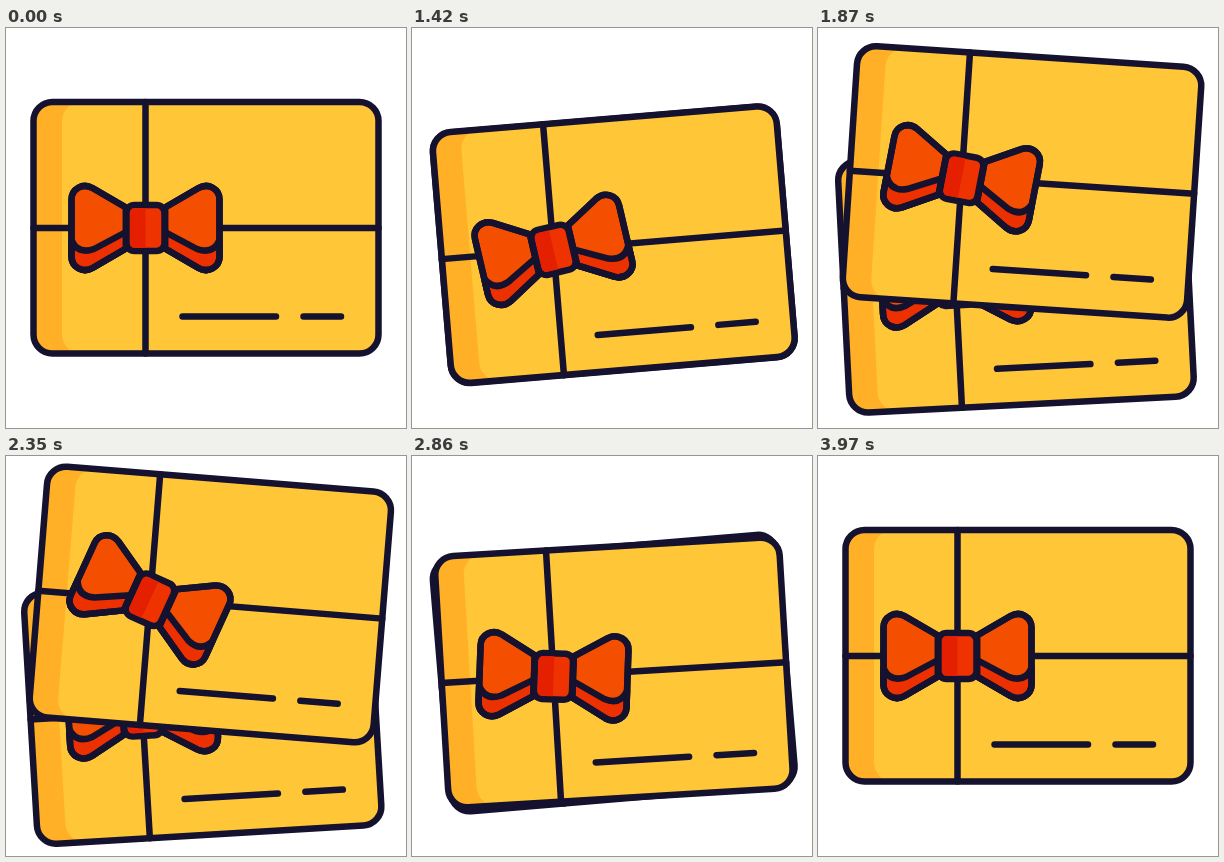
An HTML page that plays this animation: 400x400 px, repeating every 4 s.

```html
<!DOCTYPE html>
<html>
<head>
<meta charset="utf-8">
<style>
html, body { margin: 0; height: 100%; overflow: hidden; background: #fff; }
svg { display: block; width: 100vw; height: 100vh; }
</style>
</head>
<body>
<svg viewBox="0 0 400 400">
  <defs>
    <path id="shape" d="M120 179.5L86.5 160C76.5 154.5 65.5 161 65.5 171.5V228.5C65.5 239 76.5 245.5 86.5 240L120 220.5Z"/>
    <g id="wing">
      <use href="#shape" fill="#f44e00"/>
      <path fill="#ec3000" d="M65.5 212Q72 227 88 221L120 204V220.5L86.5 240C76.5 245.5 65.5 239 65.5 228.5Z"/>
      <use href="#shape" fill="none"/>
    </g>
    <g id="bow" stroke="#14122e" stroke-width="6.5" stroke-linejoin="round">
      <use href="#wing" stroke="inherit"/>
      <use href="#wing" transform="translate(279 0) scale(-1 1)"/>
      <rect x="120.5" y="177" width="38" height="46" rx="8" fill="#ee3200"/>
      <path d="M139.5 180V220H129Q124 220 124 215V185Q124 180 129 180Z" fill="#e52000" stroke="none"/>
    </g>
    <g id="card" stroke="#14122e" stroke-width="6.5" stroke-linecap="round">
      <rect x="27.5" y="74" width="345" height="251.5" rx="19" fill="#ffb027" stroke="none"/>
      <rect x="56" y="74" width="316.5" height="251.5" rx="19" fill="#ffc638" stroke="none"/>
      <path d="M139.5 74V325.5M27.5 200H372.5M176.5 288.5H270M297.5 288.5H335"/>
      <rect x="27.5" y="74" width="345" height="251.5" rx="19" fill="none"/>
    </g>
  </defs>
  <g id="back"><use href="#card"/><use href="#bow" stroke="none"/></g>
  <g id="front"><use href="#card"/><use href="#bow" id="frontBow"/></g>
</svg>
<script>
const LOOP = 4000;
const byId = id => document.getElementById(id);
const sine = u => (1 - Math.cos(Math.PI * u)) / 2;
const cubic = u => u < .5 ? 4 * u ** 3 : 1 - 4 * (1 - u) ** 3;

// Keys: [time, [values], easing towards this key]
const rest = [200, 200, 0], low = [201.8, 217, -4.8], high = [200, 192.6, 2.9];
const ending = [[3400, high], [3830, rest]];
const opening = [[1010, rest], [1400, low]];
const frontKeys = [...opening,
  [2000, [204.3, 146.5, 4.85]], [2450, [204.3, 149, 4.6]],
  [2920, [201.9, 217.2, -3.5], cubic], ...ending];
const backKeys = [...opening,
  [2000, [197.5, 255.5, -2.7]], [2450, [196.7, 253, -3.5]],
  [2920, low, cubic], ...ending];
const bowKeys = [[1010, [0]], [1450, [-8.5]], [2250, [20.5]], [3250, [-2]], [3600, [0]]];

function sample(keys, t) {
  const i = keys.findIndex(k => k[0] > t);
  if (i === 0) return keys[0][1];
  if (i < 0) return keys[keys.length - 1][1];
  const [t0, from] = keys[i - 1], [t1, to, ease = sine] = keys[i];
  const p = ease((t - t0) / (t1 - t0));
  return from.map((v, n) => v + (to[n] - v) * p);
}

function place(id, keys, t) {
  const [x, y, angle] = sample(keys, t);
  byId(id).setAttribute('transform', `translate(${x} ${y}) rotate(${angle}) translate(-200 -200)`);
}

function draw() {
  const t = performance.now() % LOOP;
  place('back', backKeys, t);
  place('front', frontKeys, t);
  byId('frontBow').setAttribute('transform', `rotate(${sample(bowKeys, t)[0]} 139.5 200)`);
  // The two cards coincide outside the split
  byId('back').setAttribute('visibility', t > 1400 && t < 3400 ? 'visible' : 'hidden');
  requestAnimationFrame(draw);
}
draw();
</script>
</body>
</html>
```
